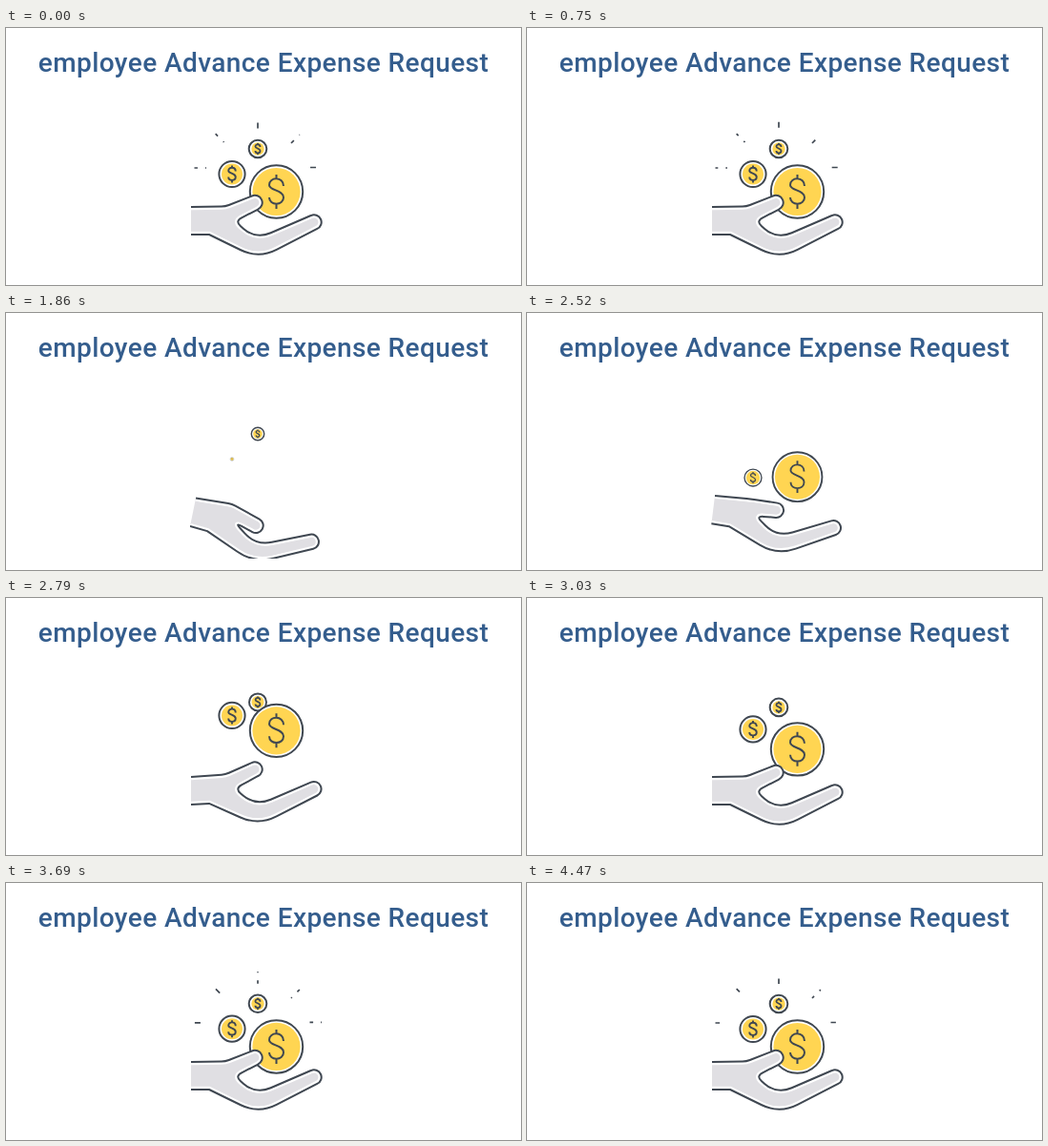
Write an HTML page that moves like this. It is 540 px wide and 270 px high and loops after 4500 ms.

```html
<!DOCTYPE html>
<html lang="en">
<head>
<meta charset="utf-8">
<title>Advance Expense Request</title>
<style>
  html, body { margin: 0; width: 100%; height: 100%; overflow: hidden; background: #fff; }
  svg { display: block; width: 100vw; height: 100vh; }
  text { font: 500 28px Roboto, sans-serif; letter-spacing: .4px; fill: #345d8d; text-anchor: middle; }
  .line { fill: none; stroke: #3f4751; }
</style>
</head>
<body>
<svg viewBox="0 0 540 270">
  <defs>
    <clipPath id="box"><rect x="193" y="80" width="142" height="178"/></clipPath>
    <clipPath id="inside"><path class="hand"/></clipPath>
  </defs>
  <text x="270" y="46">employee Advance Expense Request</text>
  <g clip-path="url(#box)">
    <path id="rays" class="line" stroke-width="1.7"/>
    <g id="coins"></g>
    <path class="hand" fill="#e0dfe3"/>
    <path class="hand" fill="none" stroke="#fff" stroke-width="6.4" clip-path="url(#inside)"/>
    <path class="hand line" stroke-width="2" stroke-linejoin="round"/>
  </g>
</svg>
<script>
const LOOP = 4500, TOSS = 2280, PEAK = 2880;
const SIGN = "M7.5 -6C7.5 -16 -7.5 -16 -7.5 -7C-7.5 -1 7.5 -2 7.5 6C7.5 15 -7.5 15 -7.5 6M0 -18V-13M0 13V18";

// Joints of the raised hand, each with its shift when the hand is lowered.
const joints = {
  wrist: [194, 188, 5, 6.5],
  knuckle: [230, 187.5, 7, 13],
  thumb: [261, 183.5, 1, 39.5],
  crook: [240, 203, 0, 17],
  palm: [262, 222, 0, 22],
  finger: [323, 204, -2.5, 36],
  heel: [265, 242.5, -5, 20],
  cuff: [213, 217, -2, 12],
  end: [194, 217, -1, 7]
};

// Drawn back to front; delay is when the coin follows the first one.
const coins = [
  { x: 264, y: 127, r: 10.3, sign: .34, ink: 1.8, delay: 240, apex: 28, damp: .006 },
  { x: 237, y: 153.5, r: 14.6, sign: .5, ink: 1.9, delay: 120, apex: 36, damp: .006 },
  { x: 283.5, y: 172, r: 28.7, sign: 1, ink: 2, delay: 0, apex: 36, damp: .009 }
];

// Inner ends from left to right, 45 degrees apart, with the dash phase.
const rays = [[210, 147, 1], [228.5, 120, 1], [264, 106, 6.5], [299, 121, 4], [318.5, 146.5, 6.5]];
const RAY = 12.5, DASH = 6, PERIOD = 14, FLOW = .0382;

const part = (t, a, b) => Math.max(0, Math.min(1, (t - a) / (b - a)));
const smooth = (t, a, b) => { const x = part(t, a, b); return x * x * (3 - 2 * x); };
const mix = (a, b, k) => a + (b - a) * k;
const at = p => p.map(v => v.toFixed(2)).join(" ");

function make(name, attrs, parent) {
  const el = document.createElementNS("http://www.w3.org/2000/svg", name);
  for (const key in attrs) el.setAttribute(key, attrs[key]);
  return parent.appendChild(el);
}

// Point at a distance d from p towards q.
function toward(p, q, d) {
  const k = d / Math.hypot(q[0] - p[0], q[1] - p[1]);
  return [mix(p[0], q[0], k), mix(p[1], q[1], k)];
}

const corner = (a, p, b, d) => `L${at(toward(p, a, d))}Q${at(p)} ${at(toward(p, b, d))}`;

// Both sides of a round tip that points away from the middle of a and b.
function tip(a, b, c, r) {
  const dx = c[0] - (a[0] + b[0]) / 2, dy = c[1] - (a[1] + b[1]) / 2;
  const k = r / Math.hypot(dx, dy);
  return [[c[0] + dy * k, c[1] - dx * k], [c[0] - dy * k, c[1] + dx * k]];
}

function handPath(t) {
  const low = 1.06 * (smooth(t, 1290, 1950) - smooth(t, TOSS, 2810));
  const hop = 3.7 * Math.sin(Math.PI * part(t, 2640, 2980)) ** 2;
  const p = {};
  for (const name in joints) {
    const [x, y, dx, dy] = joints[name];
    p[name] = [x + dx * low, y + dy * low - hop * part(x, 194, 254)];
  }
  const r = 7.7;
  const [thumbTop, thumbLow] = tip(p.knuckle, p.crook, p.thumb, r);
  const [fingerTop, fingerLow] = tip(p.palm, p.heel, p.finger, r);
  return `M${at(p.wrist)}` + corner(p.wrist, p.knuckle, thumbTop, 4) +
    `L${at(thumbTop)}A${r} ${r} 0 0 1 ${at(thumbLow)}` +
    corner(thumbLow, p.crook, p.palm, 8) + corner(p.crook, p.palm, fingerTop, 17) +
    `L${at(fingerTop)}A${r} ${r} 0 0 1 ${at(fingerLow)}` +
    corner(fingerLow, p.heel, p.cuff, 21) + `L${at(p.cuff)}L${at(p.end)}`;
}

// Rises from the hand, then falls back as a damped swing.
function lift(c, t) {
  const from = 20 + c.delay / 12;
  if (t < PEAK) return mix(from, -c.apex, smooth(t, TOSS + c.delay, PEAK));
  const w = Math.PI / 396, s = t - PEAK;
  return -c.apex * Math.exp(-c.damp * s) * (Math.cos(w * s) + c.damp / w * Math.sin(w * s));
}

function drawCoin(c, t) {
  const tossed = t >= TOSS, born = TOSS + c.delay, gone = 1485 + c.delay * .75;
  const size = tossed ? 1 - (1 - part(t, born, born + 400)) ** 3 : 1 - part(t, gone, gone + 300) ** 3;
  const dy = tossed ? lift(c, t) : 0;
  c.el.setAttribute("transform", `translate(${at([c.x, c.y + dy])}) scale(${size.toFixed(3)})`);
  c.el.style.display = size > .005 ? "" : "none";
}

function rayPath(t) {
  const early = t < 2000;
  const clock = early ? t : t - LOOP;
  const dash = early ? mix(DASH, PERIOD, part(t, 1150, 1380)) : DASH;
  const reach = RAY * (early ? 1 - part(t, 1350, 1560) ** 2 : part(t, 3120, 3260));
  const dy = early ? 0 : .6 * lift(coins[0], t);
  let d = "";
  rays.forEach(([x, y, phase], i) => {
    const angle = Math.PI * (1 + i / 4), ux = Math.cos(angle), uy = Math.sin(angle);
    const head = ((phase + FLOW * clock) % PERIOD + PERIOD) % PERIOD;
    for (const end of [head, head + PERIOD]) {
      const a = Math.max(0, end - dash), b = Math.min(reach, end);
      if (b > a) d += `M${at([x + ux * a, y + uy * a + dy])}L${at([x + ux * b, y + uy * b + dy])}`;
    }
  });
  return d;
}

const coinLayer = document.getElementById("coins");
for (const c of coins) {
  c.el = make("g", {}, coinLayer);
  make("circle", { r: c.r - 1, class: "line", style: "fill:#fff", "stroke-width": 2 }, c.el);
  make("circle", { r: c.r - 3.6, fill: "#ffd552" }, c.el);
  make("path", { d: SIGN, class: "line", "stroke-width": c.ink / c.sign, transform: `scale(${c.sign})` }, c.el);
}
const hands = document.querySelectorAll(".hand");
const rayEl = document.getElementById("rays");

function draw(t) {
  const d = handPath(t);
  hands.forEach(el => el.setAttribute("d", d));
  coins.forEach(c => drawCoin(c, t));
  rayEl.setAttribute("d", rayPath(t));
}

const start = performance.now();
function tick() {
  draw((performance.now() - start) % LOOP);
  requestAnimationFrame(tick);
}
tick();
</script>
</body>
</html>
```
